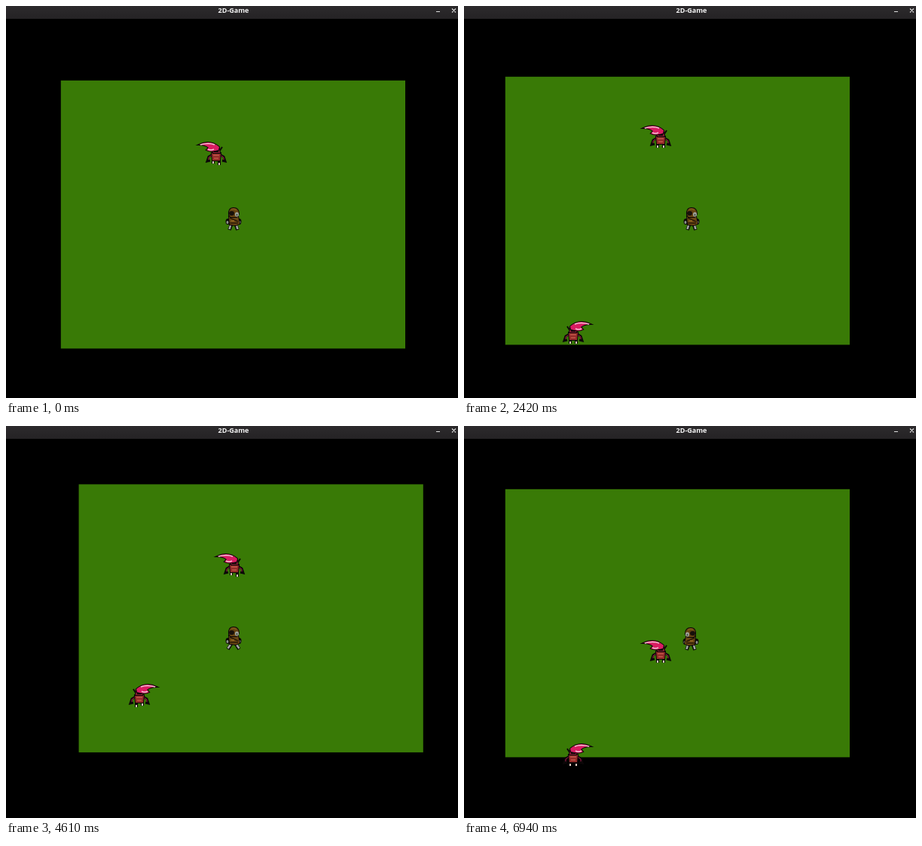
Write an HTML page with a canvas that moves like this. It is 600x520 px and loops after 6970 ms.

```html
<!DOCTYPE html>
<html>
<head>
<meta charset="utf-8">
<style>
html, body { margin: 0; width: 600px; height: 520px; overflow: hidden; background: #000; }
canvas { display: block; }
</style>
</head>
<body>
<canvas id="stage" width="600" height="520"></canvas>
<script>
const c = document.getElementById('stage').getContext('2d');
const LOOP = 6970, TILE = 50.8, GRASS = '#397a06', INK = '#0c0708';

// Tracks hold a few [time, value] points joined by straight walks.
const camX = [[30, 22], [730, -90], [1110, -90], [1360, -51.2], [1710, 4], [2850, 4],
  [3520, -103], [3655, -103], [4030, -43], [5090, 119], [5387, 119], [5550, 93], [6106, 4]];
const camY = [[400, 48], [1080, -61], [1360, -61], [2010, 43], [2590, 43], [3240, -61],
  [4030, -61], [5550, 168], [6385, 33]];
const demon = {
  x: [[0, 257]],
  y: [[0, 148], [2420, 131], [5090, 164], [5550, 163], [6940, 267]],
  flip: () => false
};
const guard = {
  x: [[2420, 141], [4030, 149], [5090, 117], [6940, 141]],
  y: [[0, 425], [1360, 392], [2420, 391], [4030, 341], [5090, 323], [6940, 404]],
  flip: t => t < 3000 || t > 4600
};

function at(track, t) {
  const i = track.findIndex(p => p[0] > t);
  if (i === 0) return track[0][1];
  if (i < 0) return track[track.length - 1][1];
  const [t0, a] = track[i - 1], [t1, b] = track[i];
  return a + (b - a) * (t - t0) / (t1 - t0);
}

const between = (t, a, b) => t > a && t < b;

function box(color, x, y, w, h) {
  c.fillStyle = color;
  c.fillRect(x, y, w, h);
}

function oval(color, x, y, rx, ry = rx) {
  c.fillStyle = color;
  c.beginPath();
  c.ellipse(x, y, rx, ry, 0, 0, 7);
  c.fill();
}

function line(color, width, path) {
  c.strokeStyle = color;
  c.lineWidth = width;
  c.stroke(new Path2D(path));
}

function shape(fill, path) {
  line(INK, 2, path);
  c.fillStyle = fill;
  c.fill(new Path2D(path));
}

function sprite(x, y, flip, draw) {
  c.save();
  c.translate(Math.round(x), Math.round(y));
  if (flip) c.scale(-1, 1);
  draw();
  c.restore();
}

function drawDemon(t) {
  const step = Math.sin(t / 70) > 0 ? 1 : 0;
  for (const side of [-1, 1]) {
    const footY = 11 + side * step;
    line(INK, 4, `M${side * 4} 7V${footY + 3}`);
    box('#d8c4ba', side * 4 - 1, footY, 2, 3);
    line(INK, 3, `M${side * 5} 1L${side * 10} 4L${side * 12} 10L${side * 8} 9`);
    line('#a51b4b', 1, `M${side * 6} 2L${side * 10} 5V8`);
    line(INK, 2, `M${side * 4} -3L${side * 8} -9`);
  }
  shape('#942b29', 'M-6 -1L6 -1L5 9L-5 9Z');
  line('#c0594a', 1.5, 'M-4 2H4M-3 6H3');
  shape('#8b1b34', 'M-5 -7L4 -7L5 -1L-4 -1Z');
  shape('#d91d62', 'M-23 -12Q-8 -19 4 -9L3 -5Q-8 -2 -13 -5L-10 -8Q-14 -12 -23 -12Z');
  line('#f3c5d7', 1.5, 'M-21 -12Q-10 -15 -2 -12M-11 -6Q-7 -4 -3 -6');
  box(INK, -3, -4, 6, 2);
}

function drawHero(pose) {
  const spread = { idle: 5.5, wide: 7.5, shut: 1.5 }[pose];
  for (const side of [-1, 1]) {
    line(INK, 4.5, `M${side * 3} 8L${side * spread} 15`);
    line('#a4aaa5', 2.5, `M${side * 4} 9L${side * spread} 14`);
    oval(INK, side * 7.5, 4, 3, 4);
    oval('#8d948c', side * 8, 5, 1.5, 2);
  }
  shape('#6b4713', 'M-6 -3L6 -3L8 7L3 9L-5 8Z');
  line('#2a1a09', 1.5, 'M-5 -1L6 4M-5 6H6');
  line('#8a6020', 2, 'M-3 3H1');
  shape('#654312', 'M-6 -5Q-7 -14 0 -14Q7 -14 7 -6L4 -2H-4Z');
  line('#85591b', 1.5, 'M-3 -12Q1 -14 4 -11');
  oval('#17100b', -2.5, -7, 3.5, 3);
  oval('#a1a79f', 4.5, -5.5, 2.5, 3);
  oval('#4a4d43', 4.5, -5, 1, 1.5);
}

// Seeded value in 0..1 for a grid cell.
function noise(col, row) {
  const v = Math.sin(col * 91.7 + row * 47.3 + 5) * 4375.85;
  return v - Math.floor(v);
}

// Soil to the left, then leaves in slanted clumps thinning into the grass.
function edgeColor(col, row) {
  const n = noise(col, row), depth = col + n;
  if (depth < 2.6) return n < 0.3 ? '#64331f' : '#965438';
  if (depth < 3.2) return n < 0.5 ? '#46200f' : '#245a08';
  if (depth > 5 + 1.5 * Math.sin(row * Math.PI / 4)) return n < 0.3 ? '#286508' : GRASS;
  return (row + col) % 4 < 2 || n > 0.8 ? '#69c51c' : '#2c6b08';
}

function edge(x, top) {
  const s = TILE / 16;
  for (let row = 0; row < 112; row++)
    for (let col = 0; col < 7; col++)
      box(edgeColor(col, row % 16), x + col * s, top + row * s, s, s);
}

function titleBar() {
  const g = c.createLinearGradient(0, 0, 0, 17);
  g.addColorStop(0, '#2c2a2c');
  g.addColorStop(1, '#252325');
  box(g, 0, 0, 600, 17);
  c.fillStyle = '#f4f4f4';
  c.font = 'bold 9px "Open Sans", "Noto Sans", sans-serif';
  c.textAlign = 'center';
  c.fillText('2D-Game', 302, 9);
  line('#ddd', 1.1, 'M571 7.5H576M592 3.5L597 8.5M597 3.5L592 8.5');
}

// First whole-tile position at or after min.
const snap = (v, min) => min + (((v - min) % TILE) + TILE) % TILE;

function draw(t) {
  const mapX = at(camX, t), mapY = at(camY, t);
  const windowX = snap(mapX, 50), top = snap(mapY, 71);
  const left = Math.max(windowX, mapX), right = windowX + 9 * TILE, bottom = top + 7 * TILE;
  box('#000', 0, 0, 600, 520);
  box(GRASS, left, top, right - left, bottom - top);
  if (mapX >= windowX - 1) edge(left, top);

  for (const foe of [demon, guard]) {
    const x = mapX + at(foe.x, t), y = mapY + at(foe.y, t);
    if (between(x, left, right) && between(y, top, bottom))
      sprite(x, y, foe.flip(t), () => drawDemon(t));
  }

  const moving = [camX, camY].some(p => at(p, t + 8) !== at(p, t - 8));
  const phase = ((t - 1360) / 480 + 20.5) % 1;
  const pose = !moving || t < 30 ? 'idle' : between(phase, 0.3, 0.85) ? 'shut' : 'wide';
  const faceRight = between(t, 30, 1110) || between(t, 2850, 3655) || t > 5387;
  const bob = { idle: 0, wide: -1, shut: 1 }[pose];
  sprite(faceRight ? 301 : 302, 282 + bob, faceRight, () => drawHero(pose));
  titleBar();
}

const start = performance.now();
function tick() {
  draw((performance.now() - start) % LOOP);
  requestAnimationFrame(tick);
}
tick();
</script>
</body>
</html>
```
